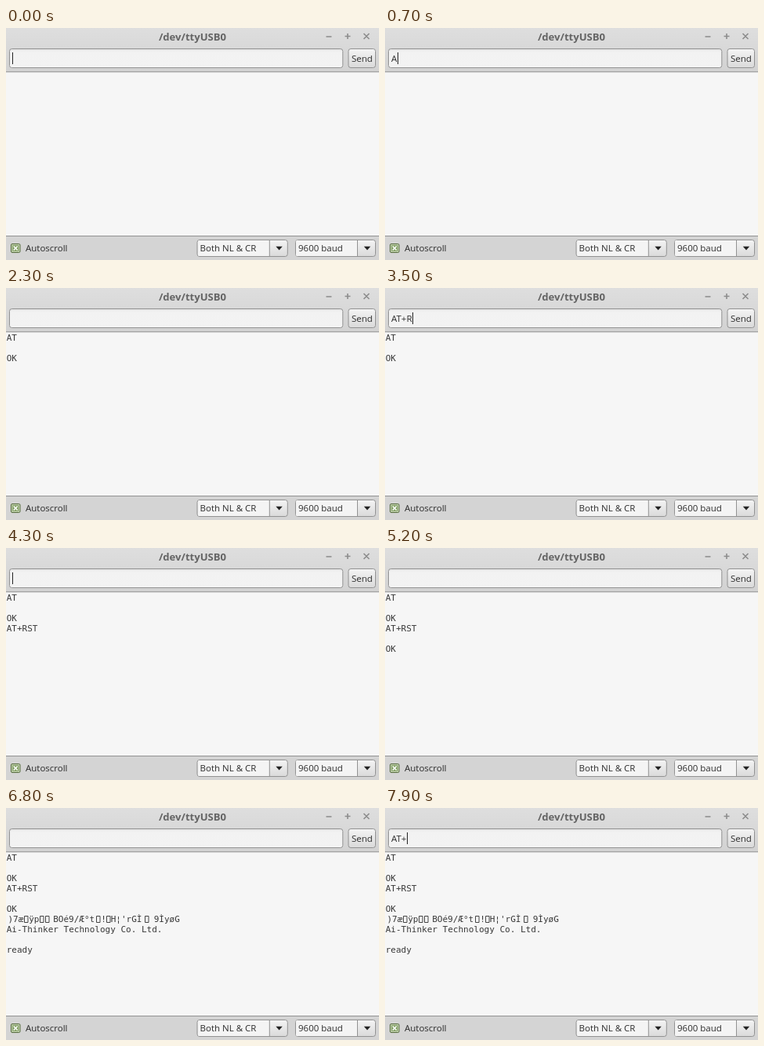
Write an HTML page that moves like this. It is 476 by 295 pixels and loops after 8000 ms.

```html
<!DOCTYPE html>
<html lang="en">
<head>
<meta charset="utf-8">
<title>Serial monitor</title>
<style>
  html, body { margin: 0; width: 100%; height: 100%; overflow: hidden; background: #d4d4d4; }
  svg { display: block; width: 476px; height: 295px; }
  text { font: 11.5px "Open Sans", "Noto Sans", sans-serif; fill: #2c2c2c; white-space: pre; }
  .title { font-size: 13.1px; font-weight: 700; fill: #646464; text-anchor: middle; }
  .log text { font: 11px "DejaVu Sans Mono", monospace; fill: #383838; }
  .tofu { fill: none; stroke: #444; }
  .icons { fill: none; stroke: #8c8c8c; stroke-width: 1.6; }
  .edge { fill: none; stroke: #929292; }
  .arrow { fill: #222; }
</style>
</head>
<body>
<svg viewBox="0 0 476 295">
  <defs>
    <linearGradient id="bar" x2="0" y2="1">
      <stop stop-color="#dedede"/><stop offset="1" stop-color="#d2d2d2"/>
    </linearGradient>
    <linearGradient id="button" x2="0" y2="1">
      <stop stop-color="#f4f4f4"/><stop offset="1" stop-color="#dadada"/>
    </linearGradient>
    <linearGradient id="field" x2="0" y2="1">
      <stop stop-color="#e2e2e2"/><stop offset=".16" stop-color="#f2f2f2"/><stop offset="1" stop-color="#f3f3f3"/>
    </linearGradient>
  </defs>

  <rect width="476" height="295" fill="#d4d4d4"/>
  <rect width="476" height="56" fill="url(#bar)"/>
  <text class="title" x="238" y="16">/dev/ttyUSB0</text>
  <path class="icons" d="M408.500 11h7M432.500 10.500h7M436 7v7M456.500 7l7 7m0-7l-7 7"/>

  <rect class="edge" x="4.500" y="26.500" width="425.300" height="24" rx="3" style="fill:url(#field)"/>
  <rect class="edge" x="437" y="26.500" width="34.500" height="24" rx="3" style="fill:url(#button)"/>
  <text x="441" y="42.500">Send</text>

  <rect y="56" width="476" height="208" fill="#f6f6f6"/>
  <path class="edge" d="M0 55.800h476M0 264.500h476"/>

  <rect x="6.500" y="274.500" width="11.500" height="11" rx="1.500" fill="#c3d2b1" stroke="#566b3f"/>
  <rect x="8.200" y="276.200" width="8" height="7.500" fill="#7f9d60"/>
  <path d="M9.700 277.500l5 5m0-5l-5 5" stroke="#fff" stroke-width="1.700"/>
  <text x="25" y="284">Autoscroll</text>

  <rect class="edge" x="244" y="269.500" width="115.300" height="21" rx="3" style="fill:url(#button)"/>
  <path d="M246.500 270h89.500v20h-89.500q-1.500 0-1.500-1.500v-17q0-1.500 1.500-1.500z" fill="#f4f4f4"/>
  <path class="edge" d="M336.300 270v20"/>
  <path class="arrow" d="M344.400 277.800h8.400l-4.200 4.600z"/>
  <text x="247.500" y="284">Both NL &amp; CR</text>

  <rect class="edge" x="369.500" y="269.500" width="102" height="21" rx="3" style="fill:url(#button)"/>
  <path d="M371.500 270h76.500v20h-76.500q-1.500 0-1.500-1.500v-17q0-1.500 1.500-1.500z" fill="#f4f4f4"/>
  <path class="edge" d="M448.500 270v20"/>
  <path class="arrow" d="M456.800 277.800h8.400l-4.200 4.600z"/>
  <text x="373" y="284">9600 baud</text>

  <g class="log" transform="translate(.7)">
    <g data-at="1800"><text x="0" y="67">AT</text><text x="0" y="93">OK</text></g>
    <g data-at="4300"><text x="0" y="106">AT+RST</text></g>
    <g data-at="4400"><text x="0" y="132">OK</text></g>
    <g data-at="6400">
      <text y="145"><tspan x="1.700">)7æ</tspan><tspan x="28.500">ÿp</tspan><tspan x="59.500">BOé9/Æ°t</tspan><tspan x="120.500">!</tspan><tspan x="133">H¦'rGÌ</tspan><tspan x="188">9ÌyøG</tspan></text>
      <path class="tofu" d="M22.800 137.500h4.500v8h-4.500zM42.800 137.500h4.500v8h-4.500zM49.800 137.500h4.500v8h-4.500zM114.800 137.500h4.500v8h-4.500zM127.800 137.500h4.500v8h-4.500zM176.800 137.500h4.500v8h-4.500z"/>
    </g>
    <g data-at="6600"><text x="0" y="158">Ai-Thinker Technology Co. Ltd.</text></g>
    <g data-at="6800"><text x="0" y="184">ready</text></g>
  </g>

  <text id="input" x="8" y="42.500"></text>
  <rect id="caret" y="31" width="1" height="15" fill="#222"/>
</svg>

<script>
  const LOOP = 8000;
  // [time, typed text, caret visible]
  const steps = [
    [0, "", 1], [500, "", 0],
    [700, "A", 1], [900, "AT", 1], [1300, "AT", 0],
    [1800, "", 1], [2300, "", 0],
    [2800, "A", 1], [3000, "AT", 1], [3300, "AT+", 1],
    [3500, "AT+R", 1], [3700, "AT+RS", 1], [3800, "AT+RST", 1],
    [4300, "", 1], [4800, "", 0], [5300, "", 1], [5500, "", 0],
    [6000, "", 1], [6500, "", 0], [7000, "", 1],
    [7400, "A", 1], [7700, "AT", 1], [7900, "AT+", 1]
  ];
  const input = document.getElementById("input");
  const caret = document.getElementById("caret");
  const lines = document.querySelectorAll("[data-at]");
  const show = (el, on) => el.setAttribute("visibility", on ? "visible" : "hidden");

  function draw(t) {
    const [, typed, blink] = steps.findLast(s => s[0] <= t);
    input.textContent = typed;
    const width = typed ? input.getComputedTextLength() : 0;
    caret.setAttribute("x", Math.round(8.4 + width));
    show(caret, blink);
    lines.forEach(line => show(line, t >= +line.dataset.at));
  }

  const start = performance.now();
  function tick() {
    draw((performance.now() - start) % LOOP);
    requestAnimationFrame(tick);
  }
  tick();
</script>
</body>
</html>
```
